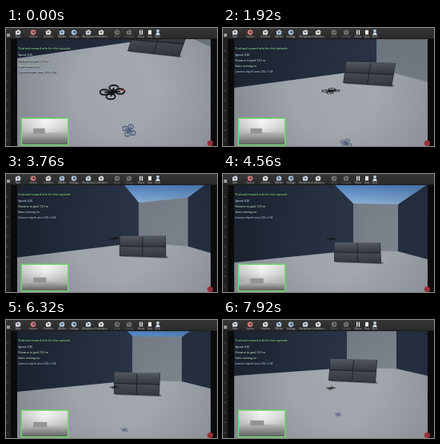
These frames come from a looping animation (264x148 px, 8000 ms). An HTML page with a canvas:

```html
<!DOCTYPE html>
<html lang="en">
<head>
<meta charset="utf-8">
<title>Drone simulator</title>
<style>
html, body { margin: 0; width: 100%; height: 100%; overflow: hidden; background: #0b0b0c; }
canvas { display: block; width: 264px; height: 148px; }
</style>
</head>
<body>
<canvas id="stage"></canvas>
<script>
const canvas = document.getElementById('stage');
const ratio = window.devicePixelRatio || 1;
canvas.width = 264 * ratio;
canvas.height = 148 * ratio;
const c = canvas.getContext('2d');
c.scale(ratio, ratio);

const LOOP = 8000, STEP = 80;
// room: left floor y, wall top x, corner x/top/floor, far corner x/top/floor, right edge top/floor
// block: corners clockwise from top left; drone and shade: x, y, width, height
const keys = [
  { t: 0,    room: [38, 260, 222, -32, 8, 290, -40, 39, -40, 45],   block: [161, 0, 228, 4, 217, 36, 152, 29],     drone: [133, 80.5, 32, 19], shade: [154, 128.5, 18, 15] },
  { t: 1040, room: [54, 240, 213, -12, 29, 290, -20, 57, -14, 60],  block: [162, 18, 228, 22, 219, 51, 155, 45],   drone: [134, 78, 27, 10],   shade: [154.5, 132, 17, 13] },
  { t: 2880, room: [98, 157, 170, 35, 75, 237, 20, 84, 4, 90],      block: [145, 69, 203, 68, 203, 97, 145, 95],   drone: [136, 80, 18, 4],    shade: [153, 158, 14, 7] },
  { t: 4560, room: [111, 140, 163, 37, 96, 219, 38, 97, 13, 107],   block: [139, 86, 197, 86, 198, 112, 139, 110], drone: [136, 81.5, 14, 3],  shade: [152, 162, 11, 5] },
  { t: 5680, room: [97, 147, 160, 27, 83, 221, 27, 84, 3, 93],      block: [136, 73, 194, 74, 193, 102, 136, 100], drone: [136, 83.5, 12, 3],  shade: [151, 148, 11, 5] },
  { t: 6880, room: [84, 156, 157, 15, 70, 219, 16, 71, -8, 80],     block: [134, 59, 192, 60, 191, 89, 134, 87],   drone: [135, 85, 12, 3.6],  shade: [146, 129, 10, 5] },
  { t: 7920, room: [70, 163, 155, 5, 60, 217, 6, 61, -18, 70],      block: [134, 49, 193, 50, 191, 79, 132, 76],   drone: [135, 85.5, 12, 4],  shade: [144, 118.5, 9.5, 5] }
];

function pose(t) {
  let i = 0;
  while (i < keys.length - 2 && t > keys[i + 1].t) i++;
  const a = keys[i], b = keys[i + 1];
  const k = Math.max(0, Math.min(1, (t - a.t) / (b.t - a.t)));
  const mix = name => a[name].map((v, j) => v + (b[name][j] - v) * k);
  return { room: mix('room'), block: mix('block'), drone: mix('drone'), shade: mix('shade') };
}

function rect(x, y, w, h, fill) {
  c.fillStyle = fill;
  c.fillRect(x, y, w, h);
}

function poly(points, fill) {
  c.beginPath();
  points.forEach(p => c.lineTo(p[0], p[1]));
  c.closePath();
  c.fillStyle = fill;
  c.fill();
}

function stops(g, colors) {
  colors.forEach((col, i) => g.addColorStop(i / (colors.length - 1), col));
  return g;
}

const fade = (x0, y0, x1, y1, ...colors) => stops(c.createLinearGradient(x0, y0, x1, y1), colors);
const glow = (x, y, r0, r1, ...colors) => stops(c.createRadialGradient(x, y, r0, x, y, r1), colors);

function disc(x, y, r, fill) {
  c.beginPath();
  c.arc(x, y, r, 0, Math.PI * 2);
  c.fillStyle = fill;
  c.fill();
}

function label(str, x, y, font, fill, align = 'left') {
  c.font = `${font} "Open Sans", sans-serif`;
  c.textAlign = align;
  c.fillStyle = fill;
  c.fillText(str, x, y);
}

function drawRoom([left, topX, cx, cTop, cFloor, rx, rTop, rFloor, eTop, eFloor]) {
  rect(14, 14, 242, 134, fade(0, 14, 0, 40, '#4f82c0', '#94b6dc'));
  poly([[14, left], [cx, cFloor], [rx, rFloor], [256, eFloor], [256, 148], [14, 148]],
    fade(14, 148, 230, 50, '#9a9ea5', '#a7abb2'));
  poly([[14, 14], [topX, 14], [cx, cTop], [cx, cFloor], [14, left]],
    fade(14, 0, cx, 0, '#1d2532', '#2a3446'));
  poly([[cx, cTop], [rx, rTop], [rx, rFloor], [cx, cFloor]],
    fade(cx, 0, rx, 0, '#747a84', '#848a93'));
  if (rx < 256) poly([[rx, rTop], [256, eTop], [256, eFloor], [rx, rFloor]], '#273142');
}

function drawBlock([ax, ay, bx, by, ex, ey, fx, fy]) {
  // u runs left to right, v top to bottom
  const at = (u, v) => [
    (ax * (1 - u) + bx * u) * (1 - v) + (fx * (1 - u) + ex * u) * v,
    (ay * (1 - u) + by * u) * (1 - v) + (fy * (1 - u) + ey * u) * v
  ];
  const quad = (u0, v0, u1, v1) => [at(u0, v0), at(u1, v0), at(u1, v1), at(u0, v1)];
  poly([at(.02, .97), at(1, .97), [ex + 3, ey - 2], [ex + 2, ey + 1], [fx + 3, fy + 1]], 'rgba(35,38,44,.45)');
  poly(quad(0, 0, 1, 1), '#202329');
  for (const v of [0, .5]) {
    for (const u of [0, .5]) {
      const top = at(u, v)[1], end = at(u, v + .5)[1];
      poly(quad(u + .008, v + .025, u + .49, v + .48),
        fade(0, top, 0, end, v ? '#484c54' : '#545861', '#343841'));
    }
  }
  poly(quad(.01, 0, .99, .03), '#656a73');
}

const plus = [[-10, 0], [2, -5.5], [10, -1], [-2, 5.5]];
const cross = [[-9, -3], [4, -6], [9, 4], [-4, 6]];

function drawDrone([x, y, w, h], rotors, ink, accent) {
  c.save();
  c.translate(x, y);
  c.scale(w / 33, h / 19);
  c.strokeStyle = c.fillStyle = ink;
  c.lineWidth = 1.9;
  rotors.forEach(([rx, ry]) => {
    c.beginPath();
    c.moveTo(0, 0);
    c.lineTo(rx, ry);
    c.stroke();
    c.beginPath();
    c.ellipse(rx, ry, 5.8, 3.3, 0, 0, Math.PI * 2);
    c.stroke();
  });
  c.beginPath();
  c.ellipse(0, 0, 5.5, 3, -.2, 0, Math.PI * 2);
  c.fill();
  if (accent) rect(11, -3, 4.5, 1.5, accent);
  c.restore();
}

const lines = [
  ['Trial and reward info for this episode', 27, '#86d486'],
  ['Speed: 0.25', 34.5, '#c3d8ea'],
  ['Distance to goal: 12.5 m', 42, '#b4d6c0'],
  ['State: moving on', 49, '#b4d6c0'],
  ['Camera depth view: 256 x 144', 56, '#a3bdd0']
];

function drawText() {
  lines.forEach(([str, y, color], i) => {
    const font = i ? '600 3.3px' : '600 3.7px';
    label(str, 15.6, y + .5, font, '#10161c');
    label(str, 15.2, y, font, color);
  });
}

function drawInset(block) {
  rect(18.5, 112.5, 60, 35, '#72d66d');
  rect(20, 114, 57, 32, fade(0, 114, 0, 134, '#f8f8f8', '#ececec', '#cacaca'));
  rect(20, 114, 57, 32, fade(20, 0, 77, 0, 'rgba(0,0,0,.16)', 'rgba(0,0,0,0)', 'rgba(0,0,0,.12)'));
  const y = 126 + Math.max(0, Math.min(5, (block[1] - 50) / 7.4));
  rect(20, y + 5, 57, 141 - y, fade(0, y + 5, 0, 146, '#b8b8b8', '#8c8c8c', '#626262'));
  rect(34.2, y, 14.5 + Math.min(2.5, Math.max(0, (155 - block[0]) / 8)), 6.5, '#949494');
}

const tools = [
  ['Save', 15, '#d3dae4'], ['Source', 34, '#d0767a'], ['Content', 53, '#dcdcdc'],
  ['Market', 70, '#a9c4e0'], ['Settings', 85, '#a6bdd8'], ['Blueprints', 103, '#cbd6e4'],
  ['Cinematics', 119, '#dcdcdc'], ['Build', 139, '#707070'], ['Compile', 154, '#707070'],
  ['Pause', 169, '#eeeeee'], ['Stop', 180, '#eeeeee'], ['Eject', 190, '#c4d8ee']
];

function drawIcon(name, x, color, round) {
  if (name === 'Pause') {
    rect(x - 2, 2.5, 1.4, 6, color);
    rect(x + .7, 2.5, 1.4, 6, color);
  } else if (name === 'Stop') {
    rect(x - 2, 2.7, 4, 5.5, color);
  } else if (name === 'Eject') {
    disc(x, 3.6, 1.8, color);
    poly([[x - 2.8, 9], [x - 1.5, 5.5], [x + 1.5, 5.5], [x + 2.8, 9]], color);
  } else if (round) {
    disc(x, 5.6, 3.3, color);
    disc(x + .6, 5.2, 1.2, '#454545');
  } else {
    poly([[x - 3.2, 4], [x + 1, 2], [x + 3.5, 4.5], [x + 2.5, 8.6], [x - 3, 8.6]], color);
    rect(x - 1.2, 4.6, 2.4, 1.5, '#4a4a4a');
  }
}

function drawFrame() {
  rect(0, 0, 264, 14, fade(0, 0, 0, 14, '#363636', '#292929'));
  rect(0, 13.3, 264, .7, '#151515');
  tools.forEach(([name, x, color], i) => {
    drawIcon(name, x, color, i % 3 === 1);
    label(name, x, 12, '3.1px', i === 7 || i === 8 ? '#707070' : '#c4c4c4', 'center');
  });
  rect(0, 14, 14, 134, '#0b0b0c');
  rect(0, 14, 6, 134, '#202122');
  for (let y = 28; y < 146; y += 12.5) rect(1, y, 2.5, 1, '#505255');
  rect(1, 7, 4, 4, '#9a9a9a');
  rect(256, 14, 8, 134, '#0b0b0c');
}

function draw(t) {
  const p = pose(t);
  c.save();
  c.beginPath();
  c.rect(14, 14, 242, 134);
  c.clip();
  drawRoom(p.room);
  drawBlock(p.block);
  drawDrone(p.shade, cross, '#53627f');
  drawDrone(p.drone, plus, '#15171a', '#a8443a');
  rect(14, 14, 242, 134, glow(135, 81, 50, 150, 'rgba(15,20,32,0)', 'rgba(15,20,32,.2)'));
  drawText();
  drawInset(p.block);
  c.restore();
  drawFrame();
  disc(255.5, 144.5, 3.6, '#94303a');
}

const start = performance.now();
function tick() {
  const t = (performance.now() - start) % LOOP;
  draw(Math.floor(t / STEP) * STEP);
  requestAnimationFrame(tick);
}
tick();
</script>
</body>
</html>
```
